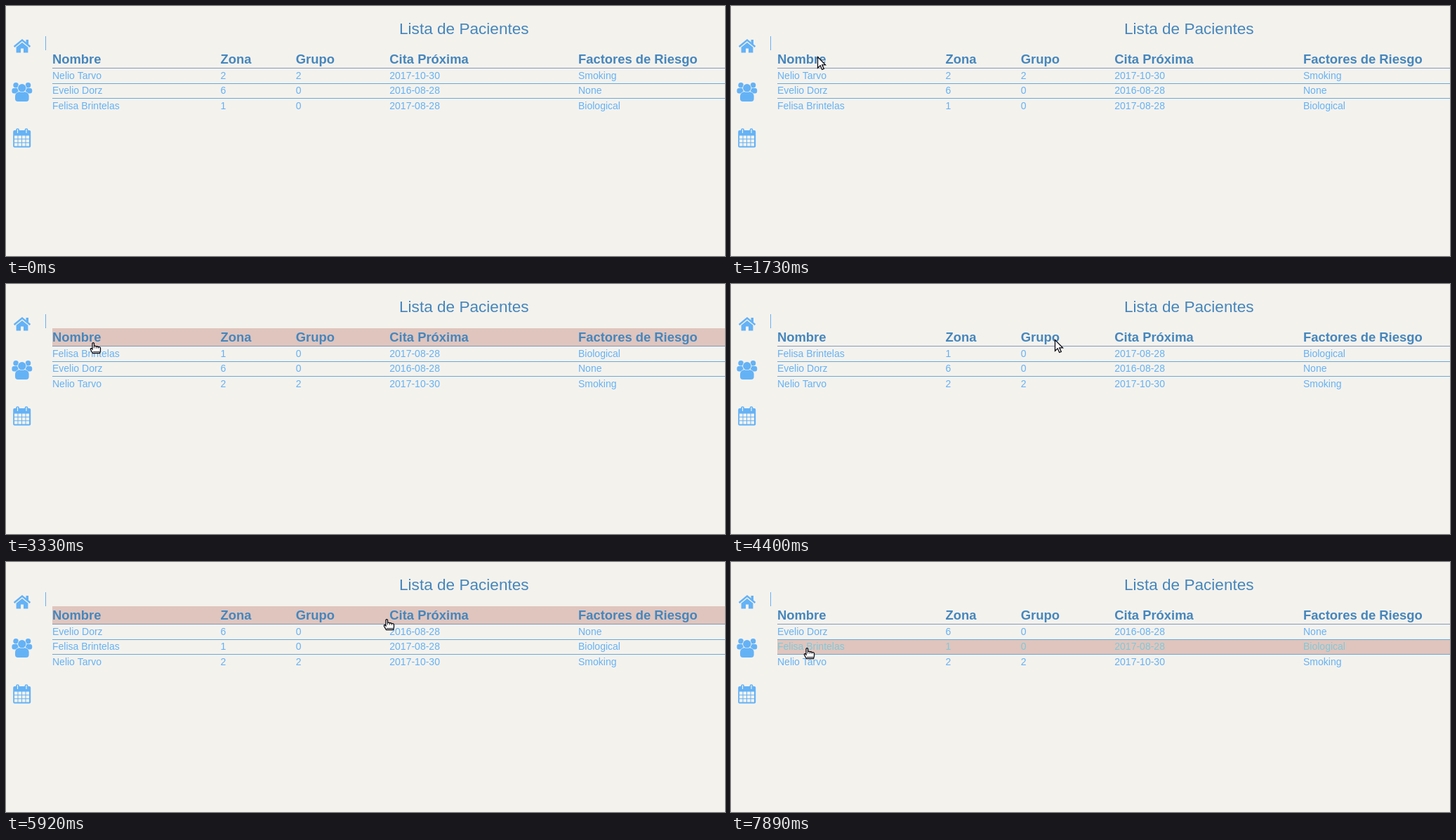
Write an HTML page with a canvas that moves like this. It is 1024 px wide and 356 px high and loops after 8000 ms.

```html
<!DOCTYPE html>
<html lang="es">
<head>
<meta charset="utf-8">
<title>Lista de Pacientes</title>
<style>
  html, body { margin: 0; width: 100%; height: 100%; overflow: hidden; background: #f4f2ed; }
  canvas { display: block; }
</style>
</head>
<body>
<canvas id="stage" width="1024" height="356"></canvas>
<script>
const ctx = document.getElementById('stage').getContext('2d');
const LOOP = 8000;
const BG = '#f4f2ed', BLUE = '#64b2f6', DARK = '#4586bd', HOVER = '#dfc5be';
const FONT = '"Liberation Sans", Arial, sans-serif';

const columns = [
  { x: 66, label: 'Nombre' },
  { x: 305.5, label: 'Zona' },
  { x: 412.7, label: 'Grupo' },
  { x: 546.3, label: 'Cita Próxima' },
  { x: 815, label: 'Factores de Riesgo' }
];
const patients = [
  ['Nelio Tarvo', '2', '2', '2017-10-30', 'Smoking'],
  ['Evelio Dorz', '6', '0', '2016-08-28', 'None'],
  ['Felisa Brintelas', '1', '0', '2017-08-28', 'Biological']
];

// Every click on a heading flips the row order; the second column clicked regroups the rows.
const clicks = [2610, 3010, 3330, 5090, 5430, 6430, 6730];
const REGROUP = 5090;

function rowOrder(t) {
  const order = t < REGROUP ? [0, 1, 2] : [0, 2, 1];
  const flipped = clicks.filter(click => click <= t).length % 2;
  return flipped ? order.reverse() : order;
}

const smooth = u => u * u * (3 - 2 * u);
const glide = u => 1 - (1 - u) ** 3;

const ENTER = 1070;
const entry = { x: 1020, y: 142 };
const moves = [
  { from: ENTER, to: 1730, x: 123, y: 72, ease: glide },
  { from: 2030, to: 2380, x: 124, y: 83, ease: smooth },
  { from: 3460, to: 3780, x: 330, y: 30, ease: smooth },
  { from: 3780, to: 4380, x: 461, y: 79, ease: smooth },
  { from: 4500, to: 4700, x: 452, y: 81, ease: smooth },
  { from: 5430, to: 6200, x: 580, y: 81, ease: smooth },
  { from: 6940, to: 7180, x: 208, y: 109, ease: smooth },
  { from: 7180, to: 7740, x: 108, y: 122, ease: glide }
];

function pointerAt(t) {
  let { x, y } = entry;
  for (const m of moves) {
    const k = m.ease(Math.min(1, Math.max(0, (t - m.from) / (m.to - m.from))));
    x += (m.x - x) * k;
    y += (m.y - y) * k;
  }
  return { x: Math.round(x), y: Math.round(y) };
}

// Row under the pointer: -1 is the heading, 0 to 2 the patients, anything else nothing.
const hoveredRow = ({ y }) => Math.floor((y - 80) / 18) - 1;
const isRow = row => row >= -1 && row < patients.length;

function rect(color, x, y, w, h) {
  ctx.fillStyle = color;
  ctx.fillRect(x, y, w, h);
}

function text(str, x, y, size, color, weight = '') {
  ctx.font = `${weight} ${size}px ${FONT}`;
  ctx.fillStyle = color;
  ctx.fillText(str, x, y);
}

function disc(x, y, r, color = BLUE) {
  ctx.fillStyle = color;
  ctx.beginPath();
  ctx.arc(x, y, r, 0, Math.PI * 2);
  ctx.fill();
}

function rounded(x, y, w, h, radii, color = BLUE) {
  ctx.fillStyle = color;
  ctx.beginPath();
  ctx.roundRect(x, y, w, h, radii);
  ctx.fill();
}

function drawHome() {
  ctx.strokeStyle = ctx.fillStyle = BLUE;
  ctx.lineWidth = 2.5;
  ctx.stroke(new Path2D('M11.6 58 L23 48.6 L34.4 58'));
  ctx.fill(new Path2D('M28.5 48H32V56L28.5 53ZM14.6 58.8L23 51.9L31.4 58.8V66.4H25V60.6H21V66.4H14.6Z'));
}

function drawUsers() {
  for (const side of [-1, 1]) {
    disc(22.8 + side * 8.7, 112.8, 3.8);
    rounded(side < 0 ? 8.4 : 28, 117, 9.2, 7.4, 3);
  }
  rounded(12.4, 121.6, 20.8, 15, [7, 7, 4, 4], BG);
  disc(22.8, 116.8, 6.4, BG);
  rounded(13, 122.2, 19.6, 13.8, [6, 6, 4, 4]);
  disc(22.8, 116.8, 6.2, BG);
  disc(22.8, 116.8, 5.7);
}

function drawCalendar() {
  rounded(10.2, 177, 25, 24.4, 2);
  for (const x of [14.5, 27]) {
    rounded(x - 0.4, 174.2, 4.8, 8.2, 2.2);
    rounded(x + 1.4, 175.6, 1.2, 5.4, 0.6, BG);
  }
  for (let row = 0; row < 3; row++)
    for (let col = 0; col < 4; col++)
      rect(BG, 12 + col * 5.5, 184.6 + row * 5.3, 4.5, 4.3);
}

const arrow = new Path2D('M.5 .5V16.2L4.2 12.8L6.7 18.5L9.3 17.4L6.8 11.8H11.5Z');
const hand = new Path2D('M-1 1.5Q0 -.2 1.5 1.5V5.5Q3 4.5 4.3 6Q6 5.2 7.2 6.7Q10 6 10.5 8.5V12L9.5 15.5H-.5L-3.5 10.5Q-4 8.3 -2.3 8.7L-1 10Z');
const knuckles = new Path2D('M1.5 5.5V8.5M4.3 6V8.8M7.2 6.7V9M0 13.5H9');

function drawPointer(t, { x, y }, row) {
  const before = pointerAt(t - 40);
  const slow = Math.hypot(x - before.x, y - before.y) < 20;
  const pointing = slow && isRow(row);
  const outline = pointing ? hand : arrow;
  ctx.save();
  ctx.translate(x, y);
  ctx.fillStyle = '#fff';
  ctx.strokeStyle = '#080810';
  ctx.lineWidth = 1.3;
  ctx.fill(outline);
  ctx.stroke(outline);
  if (pointing) {
    ctx.lineWidth = 0.8;
    ctx.stroke(knuckles);
  }
  ctx.restore();
}

const ROW_PITCH = 21.5;
const ruleY = row => Math.ceil(88 + row * ROW_PITCH);
const baseline = row => Math.floor(104 + row * ROW_PITCH);

function drawTable(t, hover) {
  if (isRow(hover)) {
    const top = hover < 0 ? 63 : ruleY(hover) + 1;
    rect(HOVER, 66, top, 958, ruleY(hover + 1) - top);
  }
  for (const { x, label } of columns) text(label, x, 82, 18.4, DARK, 'bold');
  rowOrder(t).forEach((id, row) => {
    rect(row ? '#68aada' : '#7f9bc0', 66, ruleY(row), 958, 1);
    patients[id].forEach((cell, i) =>
      text(cell, columns[i].x, baseline(row), 14, hover === row ? '#82c8d8' : BLUE));
  });
}

function draw(t) {
  const visible = t >= ENTER;
  const pointer = pointerAt(t);
  const hover = visible ? hoveredRow(pointer) : NaN;
  rect(BG, 0, 0, 1024, 356);
  text('Lista de Pacientes', 560, 40, 22.6, DARK);
  drawHome();
  drawUsers();
  drawCalendar();
  rect(BLUE, 56, 43, 1, 20);
  drawTable(t, hover);
  if (visible) drawPointer(t, pointer, hover);
}

const start = performance.now();
function tick() {
  draw((performance.now() - start) % LOOP);
  requestAnimationFrame(tick);
}
tick();
</script>
</body>
</html>
```
